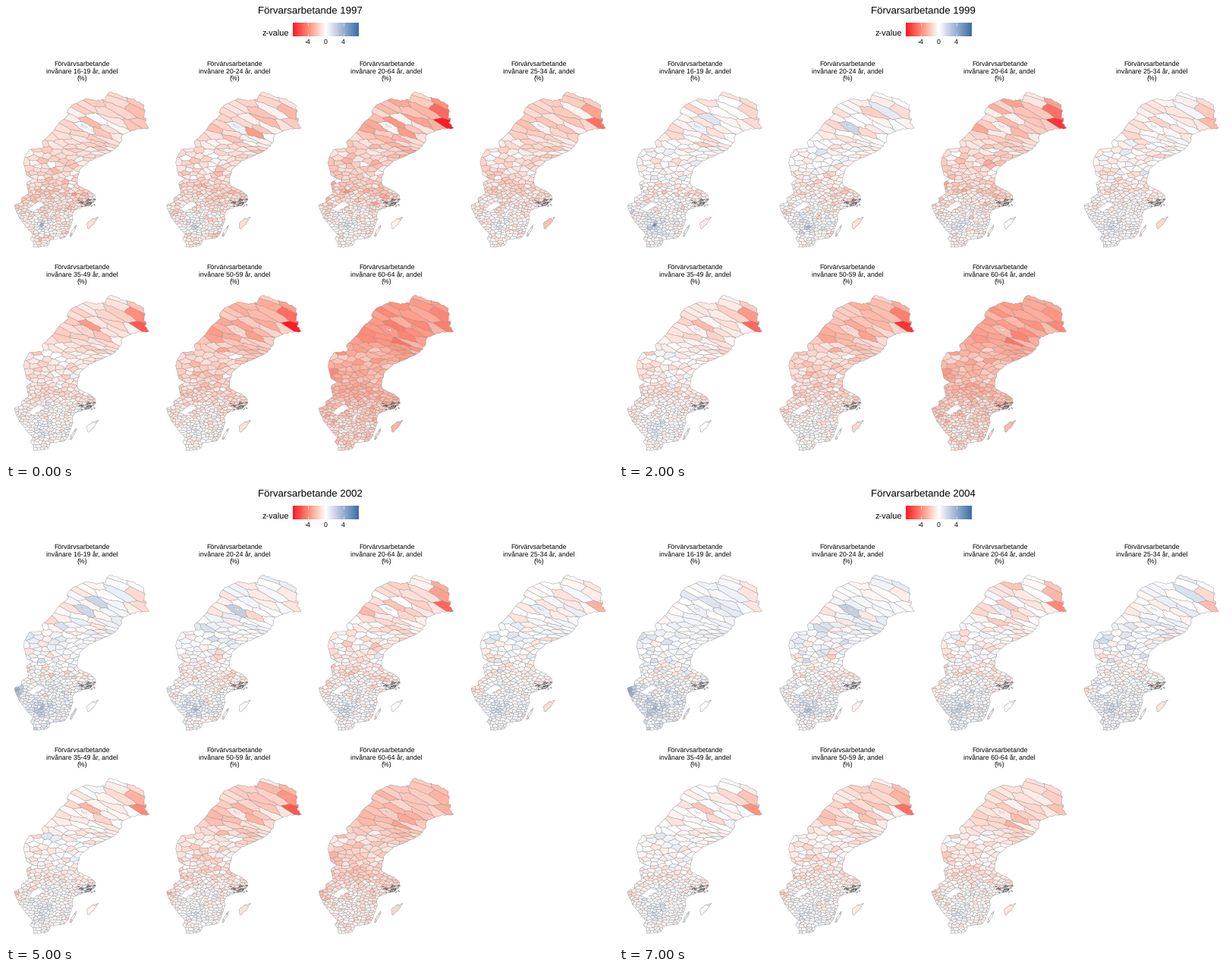
A matplotlib script for the animation above (8 s loop, 800x600 px).

```python
import numpy as np
import matplotlib.pyplot as plt
from matplotlib.animation import FuncAnimation
from matplotlib.collections import PolyCollection
from matplotlib.colors import LinearSegmentedColormap, Normalize
from matplotlib.path import Path

plt.rcParams["font.family"] = "Liberation Sans"
plt.rcParams["text.hinting"] = "none"
rng = np.random.default_rng(12)

W, H, DPI = 800, 600, 100
PX = 72 / DPI
FIRST_YEAR, N_YEARS = 1997, 8
STEP_X, STEP_Y = 200.6, 268
LIMIT = 7.35
MID_X = 60

# Per age group: z-value in north and south at the start and at the end,
# pace of the change, and how far the north-east corner falls behind
GROUPS = {
    "16-19": (-1.3, -.9, .3, .6, .35, .5),
    "20-24": (-1.2, -.8, .4, .1, .4, .7),
    "20-64": (-2, -.7, -.4, .3, 1, 2.8),
    "25-34": (-1.3, -.5, .35, .4, .5, 1.5),
    "35-49": (-1.1, -.2, -.2, .1, .9, 2.6),
    "50-59": (-2.1, -.4, -1, .1, 1.3, 3.2),
    "60-64": (-3.3, -1.5, -1, 0, 1.5, .3),
}

# Key points of the map, in pixels of the first panel
MAINLAND = [
    (139, 113), (155, 120), (165, 122), (176, 127), (181, 131), (183, 140), (181, 147),
    (185, 148), (183, 154), (188, 161.5), (175, 162), (164, 165), (155, 169), (151, 174),
    (153, 178), (148, 183), (142, 190), (127, 197), (110, 204), (98, 214), (94, 229),
    (94, 236), (108, 243), (117, 249), (118, 256), (111, 262), (101, 265), (91, 269),
    (87, 274), (88, 281), (82, 299), (77, 306), (59, 308), (55, 316), (43, 318),
    (36, 318), (37, 313), (32, 306), (36, 301), (29, 294), (18, 280), (11.5, 265),
    (12, 262), (21, 259), (20, 254), (30, 247), (27, 234), (35, 228), (27, 223),
    (23, 206), (26, 196), (32, 189), (50, 187), (47, 179), (60, 168), (70, 154),
    (83, 143), (80, 139), (87, 131), (106, 122), (119, 125), (131, 123), (134, 115),
]
GOTLAND = [(113, 281), (122, 278.5), (115, 288), (109, 294), (107, 293), (107, 286)]
OLAND = [(93, 288.5), (91, 295), (85.5, 304), (84, 304), (87, 296)]
LAKES = [
    [(30, 269), (34, 263), (40, 259), (46, 259), (51, 262), (41, 268), (36, 272)],
    [(54, 281), (57, 274), (62, 267), (63, 269), (59, 276)],
    [(99, 156), (103, 158), (105, 157.5), (106.5, 160), (103, 160)],
]
NORTH_EAST, FAR_EAST, LAPLAND = (172, 139), (184, 159), (105, 160)
SMALAND, WEST = (47, 288), (13, 265)
PLACED = [NORTH_EAST, FAR_EAST, LAPLAND, SMALAND, WEST,
          (146, 126), (135, 141), (122, 151), (112, 286), (89, 297)]


def slope(v):
    """Tilt of the district strips, fading out southwards."""
    return .42 * np.clip((205 - v) / 60, 0, 1)


def stretch(v):
    """Length of the strips relative to their height."""
    return np.interp(v, [130, 215], [2.9, 1.6])


def to_strip(p):
    dx, y = p[:, 0] - MID_X, p[:, 1]
    v = y
    for _ in range(40):
        v = y - slope(v) * dx
    return np.column_stack([dx / stretch(v), v])


def from_strip(p):
    v = p[:, 1]
    dx = p[:, 0] * stretch(v)
    return np.column_stack([MID_X + dx, v + slope(v) * dx])


def densify(poly, n=5):
    poly = np.asarray(poly, float)
    t = np.arange(n)[None, :, None] / n
    nxt = np.roll(poly, -1, axis=0)
    return (poly[:, None] * (1 - t) + nxt[:, None] * t).reshape(-1, 2)


def wiggle(p):
    """Bend lines a little; shared borders stay shared."""
    x, y = p.T
    amp = np.interp(y, [180, 260], [.8, .5])
    dx = .6 * np.sin(.9 * y + .5 * x) + .5 * np.sin(1.9 * x - 1.5 * y)
    dy = .6 * np.sin(.8 * x - .6 * y + 1) + .5 * np.sin(1.7 * y + 1.3 * x)
    return p + amp[:, None] * np.column_stack([dx, dy])


def cut(poly, mid, normal):
    side = (poly - mid) @ normal
    out = []
    for i in range(len(poly)):
        a, b, sa, sb = poly[i - 1], poly[i], side[i - 1], side[i]
        if (sa < 0) != (sb < 0):
            out.append(a + (b - a) * sa / (sa - sb))
        if sb < 0:
            out.append(b)
    return np.array(out)


def voronoi(sites):
    box = np.array([(-60, 20), (80, 20), (80, 380), (-60, 380)], float)
    cells = []
    for s in sites:
        cell = box
        order = np.argsort(((sites - s) ** 2).sum(axis=1))
        for other in sites[order[1:45]]:
            cell = cut(cell, (s + other) / 2, other - s)
        cells.append(cell)
    return cells


def scatter_sites(land):
    """Fill the land with districts, smaller and denser southwards."""
    tries = rng.uniform((10, 113), (190, 319), (16000, 2))
    tries = to_strip(tries[land.contains_points(tries)])
    gaps = np.interp(tries[:, 1], [110, 150, 190, 215, 240, 265],
                     [9, 8, 6.8, 5.3, 3.7, 2.8])
    gaps *= rng.uniform(.8, 1.25, len(gaps))
    sites = list(to_strip(np.array(PLACED, float)))
    for p, gap in zip(tries, gaps):
        if np.hypot(*(np.array(sites) - p).T).min() > gap:
            sites.append(p)
    return np.array(sites)


def z_values(sites):
    """Array of year x group x district."""
    n, groups = len(sites), len(GROUPS)
    y = sites[:, 1]
    t = np.linspace(0, 1, N_YEARS)[:, None]
    south = np.clip((y - 165) / 120, 0, 1)
    late = np.clip(t * 1.5 - .2, 0, 1)
    dip = .5 * np.exp(-((y - 238) / 20) ** 2)

    def near(center, r):
        d2 = ((sites - center) ** 2).sum(axis=1)
        return np.exp(-d2 / (2 * r * r))

    common = rng.normal(0, .35, n)
    z = np.empty((N_YEARS, groups, n))
    for k, (n0, s0, n1, s1, pace, lag) in enumerate(GROUPS.values()):
        youth = 1 - k / (groups - 1)
        start = n0 + (s0 - n0) * south
        end = n1 + (s1 - n1) * south
        z[:, k] = start + (end - start) * t ** pace - dip + common
        z[:, k] += rng.normal(0, .4, n)
        z[:, k] += rng.normal(0, .15 + .25 * youth, (N_YEARS, n))
        z[:, k] -= lag * (1 - .3 * t) * (near(NORTH_EAST, 5) + 1.6 * near(FAR_EAST, 4.5))
        z[:, k] += 1.5 * youth * near(LAPLAND, 5) + (.4 + youth) * near(SMALAND, 10)
        z[:, k] += 4 * youth ** 6 * (1 - .6 * t) * near(SMALAND, 2)
        z[:, k] += late * (6 * youth ** 6 - 1.5) * near(WEST, 6)
    return z


def islets():
    """Dense archipelago on the east coast."""
    shapes = []
    for _ in range(32):
        c = rng.normal((108, 260), (5, 2.3))
        a = np.sort(rng.uniform(0, 2 * np.pi, 6))
        r = rng.uniform(.4, 1.7, 6)
        shapes.append(c + np.column_stack([1.3 * r * np.cos(a), .9 * r * np.sin(a)]))
    return shapes


cmap = LinearSegmentedColormap.from_list("z", [
    (0, "#ff1a24"), (.25, "#ff937e"), (.375, "#fdcbbf"), (.5, "#ffffff"),
    (.625, "#d0d9e9"), (.75, "#a2b5d3"), (1, "#3b6ea8")])
norm = Normalize(-LIMIT, LIMIT)

fig = plt.figure(figsize=(W / DPI, H / DPI), dpi=DPI, facecolor="white")
ax = fig.add_axes([0, 0, 1, 1])
ax.axis("off")


def label(x, y, s, size, ha="center"):
    return ax.text(x, y, s, fontsize=size * PX, ha=ha, va="baseline", color="black")


# Legend
ax.imshow(np.linspace(-LIMIT, LIMIT, 256)[None], cmap=cmap, norm=norm,
          extent=(378, 464.5, 40, 22), aspect="auto", interpolation="bilinear")
label(338, 40, "z-value", 11, "left")
for tick in (-4, 0, 4):
    x = 421.2 + tick * 5.88
    for y in (22, 36.4):
        ax.plot([x, x], [y, y + 3.6], color="white", lw=.5 * PX)
    label(x, 50, str(tick), 8.8)
title = label(401, 10.3, "", 13.2)

# Map geometry
outlines = [wiggle(densify(p)) for p in (MAINLAND, GOTLAND, OLAND)]
strip_sites = scatter_sites(Path(outlines[0]))
cells = [wiggle(from_strip(densify(c))) for c in voronoi(strip_sites)]
lakes = [wiggle(densify(p)) for p in LAKES]
isles = islets()
values = z_values(from_strip(strip_sites))


def add_polys(polys, shift, color, width, **kw):
    coll = PolyCollection([p + shift for p in polys], edgecolors=color,
                          linewidths=width * PX, **kw)
    ax.add_collection(coll, autolim=False)
    return coll


maps = []
for k, age in enumerate(GROUPS):
    shift = np.array([k % 4 * STEP_X, k // 4 * STEP_Y])
    lines = ["Förvärvsarbetande", f"invånare {age} år, andel", "(%)"]
    for i, line in enumerate(lines):
        label(100.4 + shift[0], 79.2 + 9.5 * i + shift[1], line, 8.8)

    districts = add_polys(cells, shift, "#858585", .33, cmap=cmap, norm=norm)
    shore = Path.make_compound_path(
        *[Path(np.vstack([o, o[:1]]) + shift, closed=True) for o in outlines])
    districts.set_clip_path(shore, ax.transData)
    add_polys(lakes, shift, "#959595", .3, facecolors="white")
    add_polys(outlines, shift, "#858585", .38, facecolors="none")
    add_polys(isles, shift, "#505050", .36, facecolors="none")
    maps.append(districts)

ax.set_xlim(0, W)
ax.set_ylim(H, 0)


def draw(i):
    title.set_text(f"Förvarsarbetande {FIRST_YEAR + i}")
    for districts, z in zip(maps, values[i]):
        districts.set_array(z)
    return [title, *maps]


anim = FuncAnimation(fig, draw, frames=N_YEARS, interval=1000, repeat=True)
plt.show()
```
